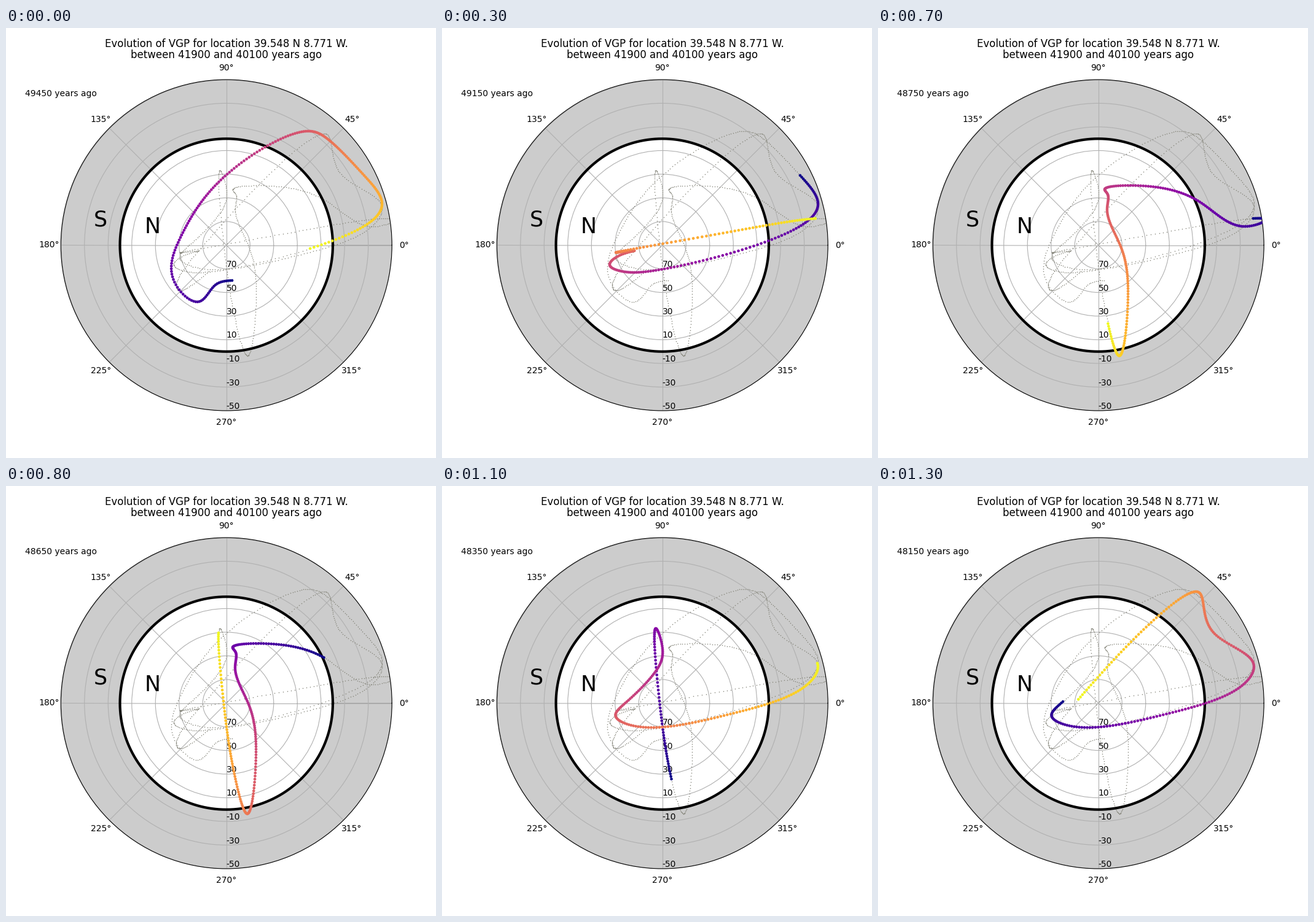
A matplotlib script that plays this animation: 700 px wide and 700 px high, repeating every 1.4 s.

```python
import numpy as np
import matplotlib.pyplot as plt
from matplotlib.animation import FuncAnimation

SIZE, DPI = 700, 100
FRAMES, INTERVAL = 14, 100
STEP, WINDOW = 50, 200          # track points per frame and per coloured tail
CENTER = np.array([358.75, 353.5])
PX_PER_DEG = 269.5 / 140

# Turning points of the pole path in stage pixels: (frames taken, points)
LEGS = [
    (1, [(368, 411), (340, 419), (314, 445.5), (272, 408)]),
    (2, [(284, 341), (360, 238), (489, 168), (524, 181)]),
    (2, [(583, 240), (612, 284), (590, 318), (360, 392.5), (290, 395.5)]),
    (2, [(273, 386), (292, 369), (313, 362.5), (285, 365.5), (440, 337)]),
    (2, [(611, 310), (631, 312), (595, 323), (522, 282), (420, 256.5), (369, 263)]),
    (2, [(374, 271), (373, 297), (394, 353), (407, 436), (393, 533.5)]),
    (2, [(373.5, 477), (354, 350), (348.5, 232), (359, 265), (349, 300)]),
    (2, [(301, 351), (282.5, 374), (318, 391.5), (470, 371), (596, 322)]),
    (2, [(610, 286), (548, 240.5), (530, 195), (522, 173), (457, 211)]),
    (1, [(323, 351), (277, 419), (281, 427), (330, 396)]),
]


def time_knots(legs):
    """Knot times in frames; the pole slows down where turns lie close together."""
    times = [0.0]
    for i, (frames, points) in enumerate(legs):
        following = legs[i + 1][1][:1] if i + 1 < len(legs) else []
        steps = np.hypot(*np.diff(points + following, axis=0).T) ** 0.6
        times.extend(times[-1] + frames * np.cumsum(steps) / steps.sum())
    return np.array(times), np.array([p for _, points in legs for p in points])


def natural_spline(times, knots, t):
    h = np.diff(times)
    slopes = np.diff(knots, axis=0) / h[:, None]
    system = np.eye(len(times))
    rhs = np.zeros_like(knots)
    for i in range(1, len(h)):
        system[i, i - 1:i + 2] = h[i - 1], 2 * (h[i - 1] + h[i]), h[i]
        rhs[i] = 6 * (slopes[i] - slopes[i - 1])
    bend = np.linalg.solve(system, rhs)
    i = np.clip(np.searchsorted(times, t, side="right") - 1, 0, len(h) - 1)
    width = h[i][:, None]
    b = (t - times[i])[:, None] / width
    a = 1 - b
    return (a * knots[i] + b * knots[i + 1]
            + ((a**3 - a) * bend[i] + (b**3 - b) * bend[i + 1]) * width**2 / 6)


def to_polar(pixels):
    dx, dy = (pixels - CENTER).T
    return np.column_stack([np.arctan2(-dy, dx), np.hypot(dx, dy) / PX_PER_DEG])


def stage_text(x, y, text, **style):
    return fig.text(x / SIZE, 1 - y / SIZE, text, va="baseline", **style)


times, knots = time_knots(LEGS)
moments = np.arange(round(times[-1] * STEP) + 1) / STEP
track = to_polar(natural_spline(times, knots, moments))

fig = plt.figure(figsize=(SIZE / DPI, SIZE / DPI), dpi=DPI)
ax = fig.add_subplot(projection="polar")
ax.set_ylim(0, 140)
rings = range(20, 141, 20)
ax.set_yticks(rings, [f"{90 - r}" for r in rings])
ax.set_rlabel_position(270)
ax.set_title("Evolution of VGP for location 39.548 N 8.771 W.\n"
             "between 41900 and 40100 years ago", linespacing=1.0)

circle = np.linspace(0, 2 * np.pi, 361)
ax.fill_between(circle, 90, 140, color="black", alpha=0.2, zorder=0.5)
ax.plot(circle, np.full_like(circle, 90), color="black", linewidth=3)
ax.scatter(*track.T, s=1.2, color="#85857a", linewidth=0, zorder=1.6)
tail = ax.scatter(*track[:WINDOW].T, c=np.linspace(0, 1, WINDOW),
                  cmap="plasma", s=11, linewidth=0, zorder=3)

stage_text(153.7, 322.7, "S", ha="center", fontsize=25)
stage_text(238.5, 333.5, "N", ha="center", fontsize=25)
year_label = stage_text(31, 111, "", ha="left", fontsize=10)


def update(frame):
    start = STEP * frame
    tail.set_offsets(track[start:start + WINDOW])
    year_label.set_text(f"{49450 - 100 * frame} years ago")
    return tail, year_label


animation = FuncAnimation(fig, update, frames=FRAMES, interval=INTERVAL, repeat=True)
plt.show()
```
